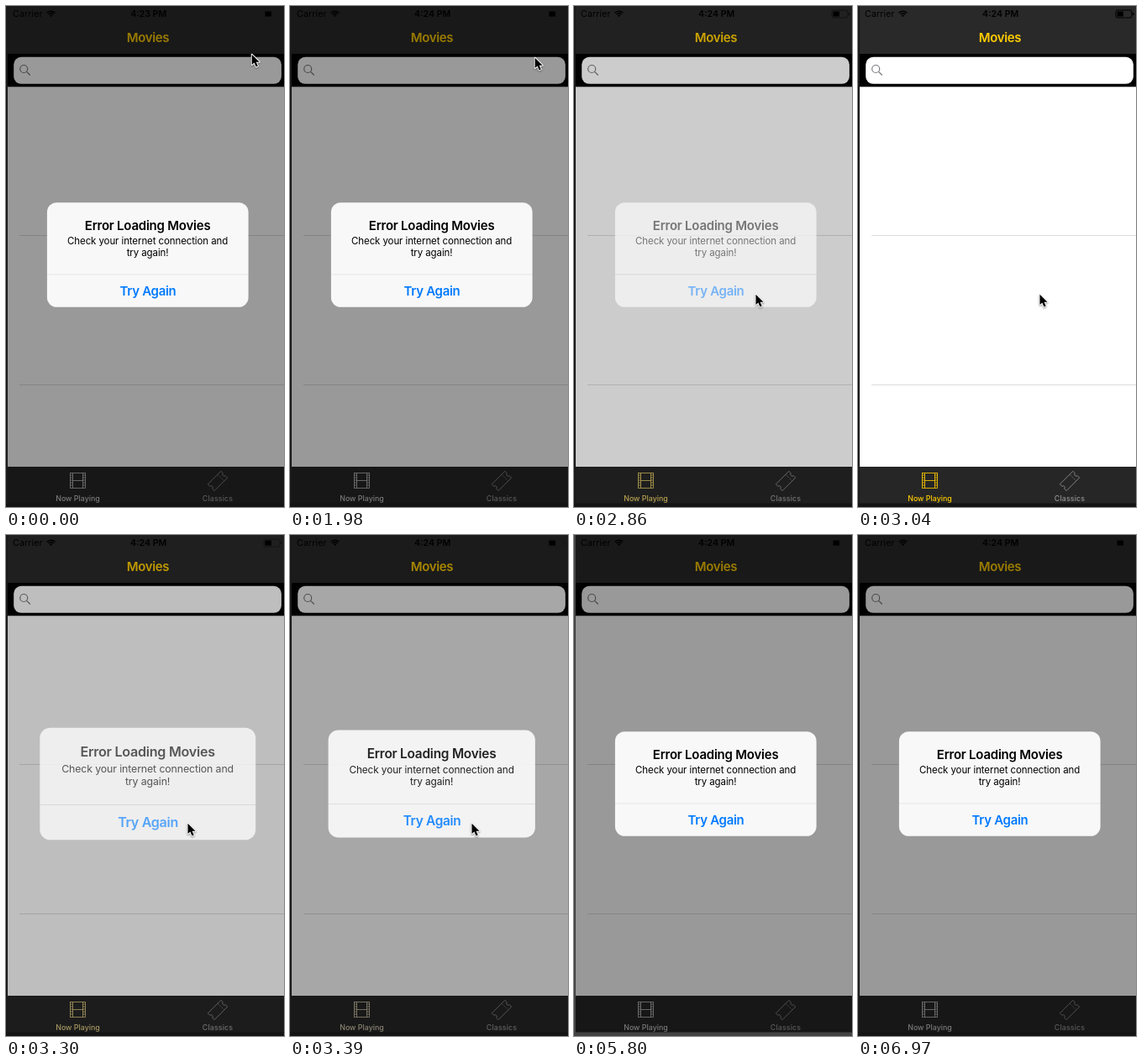
An HTML page with a canvas for the animation above (8 s loop, 331x597 px).

```html
<!DOCTYPE html>
<html lang="en">
<head>
<meta charset="utf-8">
<title>Movies</title>
<style>
html, body { margin: 0; width: 331px; height: 597px; overflow: hidden; background: #171717; }
canvas { display: block; width: 331px; height: 597px; }
</style>
</head>
<body>
<canvas id="stage"></canvas>
<script>
const W = 331, H = 597, LOOP = 8000;
const FONT = 'Inter, "Open Sans", sans-serif';
const canvas = document.getElementById('stage');
const ctx = canvas.getContext('2d');
const dpr = window.devicePixelRatio || 1;
canvas.width = W * dpr;
canvas.height = H * dpr;

const mix = (a, b, p) => a + (b - a) * p;
const smooth = u => u * u * (3 - 2 * u);

// Index of the current picture in a run of n evenly spaced steps.
const stepAt = (t, start, end, n) =>
  Math.min(n - 1, Math.floor((t - start) / ((end - start) / (n - 1)) + 0.01));

function rect(x, y, w, h, color) {
  ctx.fillStyle = color;
  ctx.fillRect(x, y, w, h);
}

function round(x, y, w, h, r, color) {
  ctx.fillStyle = color;
  ctx.beginPath();
  ctx.roundRect(x, y, w, h, r);
  ctx.fill();
}

function text(str, x, y, size, weight, color, spacing = 0, align = 'center') {
  ctx.font = `${weight} ${size}px ${FONT}`;
  ctx.letterSpacing = spacing + 'px';
  ctx.textAlign = align;
  ctx.fillStyle = color;
  ctx.fillText(str, x, y);
}

function poly(points, close = true) {
  ctx.beginPath();
  points.forEach(([x, y]) => ctx.lineTo(x, y));
  if (close) ctx.closePath();
}

// How present the alert is, and its size.
function alertState(t) {
  if (t < 2770) return { p: 1, scale: 1 };
  if (t < 3300) {
    const k = stepAt(t, 2770, 3040, 4);
    return { p: 1 - smooth((k + 1) / 4), scale: 1 };
  }
  const k = stepAt(t, 3300, 3650, 5);
  const p = k === 4 ? 1 : 1 - 0.36 * Math.pow(0.38, k);
  return { p, scale: 1 + 0.2 * (1 - p) };
}

function cursorPos(t) {
  if (t < 1980) return [292.7, 57.8];
  const u = smooth((stepAt(t, 1980, 2420, 6) + 0.37) / 5.37);
  return [mix(292.7, 216.5, u), mix(57.8, 343.8, u)];
}

function wifi(x, y) {
  ctx.strokeStyle = ctx.fillStyle = '#000';
  ctx.lineWidth = 1.4;
  for (const r of [4.2, 6.8]) {
    ctx.beginPath();
    ctx.arc(x, y, r, -Math.PI * 0.76, -Math.PI * 0.24);
    ctx.stroke();
  }
  ctx.beginPath();
  ctx.moveTo(x, y);
  ctx.arc(x, y, 2.4, -Math.PI * 0.76, -Math.PI * 0.24);
  ctx.fill();
}

function statusBar(t, p) {
  text('Carrier', 8, 13, 10.6, 400, '#000', 0.15, 'left');
  wifi(53.5, 13);
  text(t < 720 ? '4:23 PM' : '4:24 PM', 169.7, 13, 10.6, 600, '#000');
  rect(308.5, 6.5, 7.5, 6, '#000');
  ctx.globalAlpha = 1 - p;
  ctx.strokeStyle = '#000';
  ctx.lineWidth = 1;
  ctx.beginPath();
  ctx.roundRect(307, 5, 19, 9, 2);
  ctx.stroke();
  rect(327, 8, 1.3, 3, '#000');
  ctx.globalAlpha = 1;
}

function searchBar() {
  rect(2, 57, W, 40, '#000');
  round(9.2, 60.8, 318.7, 32, 8.9, '#fff');
  ctx.strokeStyle = '#7c7c80';
  ctx.lineWidth = 1.2;
  ctx.beginPath();
  ctx.arc(21.2, 75, 4.5, 0, Math.PI * 2);
  ctx.moveTo(24.5, 78.3);
  ctx.lineTo(28.8, 82.5);
  ctx.stroke();
}

function filmIcon(color) {
  ctx.strokeStyle = color;
  ctx.lineWidth = 0.8;
  ctx.strokeRect(76.5, 556.5, 18, 18);
  ctx.beginPath();
  for (const x of [79.5, 91.5]) {
    ctx.moveTo(x, 556.5);
    ctx.lineTo(x, 574.5);
  }
  ctx.moveTo(79.5, 565.5);
  ctx.lineTo(91.5, 565.5);
  for (let y = 559; y < 574; y += 3) {
    ctx.moveTo(76.5, y);
    ctx.lineTo(79.5, y);
    ctx.moveTo(91.5, y);
    ctx.lineTo(94.5, y);
  }
  ctx.stroke();
}

function ticketIcon(color) {
  ctx.save();
  ctx.translate(252, 566);
  ctx.rotate(-Math.PI / 4);
  ctx.strokeStyle = color;
  ctx.lineWidth = 0.8;
  ctx.beginPath();
  ctx.moveTo(-11, -5.5);
  ctx.lineTo(11, -5.5);
  ctx.lineTo(11, -2);
  ctx.arc(11, 0, 2, -Math.PI / 2, Math.PI / 2, true);
  ctx.lineTo(11, 5.5);
  ctx.lineTo(-11, 5.5);
  ctx.lineTo(-11, 2);
  ctx.arc(-11, 0, 2, Math.PI / 2, -Math.PI / 2, true);
  ctx.closePath();
  ctx.stroke();
  ctx.setLineDash([1.5, 1.5]);
  poly([[5.5, -5], [5.5, 5]], false);
  ctx.stroke();
  ctx.restore();
}

function tabBar(p) {
  rect(2, 549, W, 44, '#262626');
  const tint = `rgb(${mix(255, 200, p)}, ${mix(204, 200, p)}, ${mix(0, 200, p)})`;
  filmIcon(tint);
  text('Now Playing', 85.5, 589.7, 8.9, 500, tint);
  ticketIcon('#929292');
  text('Classics', 252, 589.7, 8.9, 500, '#929292', 0.1);
}

function app(t, p) {
  rect(2, 0, W, 58, '#292929');
  statusBar(t, p);
  text('Movies', 169, 43, 15, 600, '#ffcc00', -0.35);
  searchBar();
  rect(2, 96.3, W, 453, '#fff');
  for (const y of [273, 451]) rect(16, y, W, 1, '#dcdcde');
  tabBar(p);
}

function alertBox({ p, scale }) {
  if (p <= 0) return;
  ctx.save();
  ctx.translate(168.75, 296.5);
  ctx.scale(scale, scale);
  ctx.translate(-168.75, -296.5);
  ctx.globalAlpha = Math.pow(p, 0.42);
  round(48.9, 234.2, 239.7, 124.6, 11.5, '#f8f8f8');
  rect(49, 319.5, 239.5, 0.9, `rgba(0, 0, 0, ${mix(0.2, 0.08, p)})`);
  ctx.globalAlpha = p;
  text('Error Loading Movies', 168.6, 266.5, 15, 600, '#000', -0.23);
  text('Check your internet connection and', 168.6, 284, 11.5, 400, '#000', -0.1);
  text('try again!', 168.6, 298, 11.5, 400, '#000', -0.1);
  text('Try Again', 169, 345, 15, 600, '#007aff', -0.3);
  ctx.restore();
}

function cursor([x, y]) {
  ctx.save();
  ctx.translate(x, y);
  ctx.scale(0.88, 0.88);
  poly([[0, 0], [0, 14], [3.2, 11.1], [5.7, 16.7],
        [8.2, 15.6], [5.8, 10.2], [10.3, 10.2]]);
  ctx.lineJoin = 'round';
  ctx.lineWidth = 2.2;
  ctx.strokeStyle = '#fff';
  ctx.shadowColor = 'rgba(0, 0, 0, 0.4)';
  ctx.shadowBlur = 2 * dpr;
  ctx.shadowOffsetY = dpr;
  ctx.stroke();
  ctx.shadowColor = 'transparent';
  ctx.fillStyle = '#000';
  ctx.fill();
  ctx.restore();
}

function draw(t) {
  const state = alertState(t);
  const lit = t >= 5800 && t < 6970;
  ctx.setTransform(dpr, 0, 0, dpr, 0, 0);
  app(t, state.p);
  rect(2, 0, W, 593, `rgba(0, 0, 0, ${0.4 * state.p})`);
  rect(0, 0, 2, H, lit ? '#444' : '#1a1a1a');
  rect(0, 592.5, W, 5, lit ? '#444' : '#141414');
  alertBox(state);
  if (t < 3820) cursor(cursorPos(t));
}

const begin = performance.now();
function tick() {
  draw((performance.now() - begin) % LOOP);
  requestAnimationFrame(tick);
}
tick();
</script>
</body>
</html>
```
